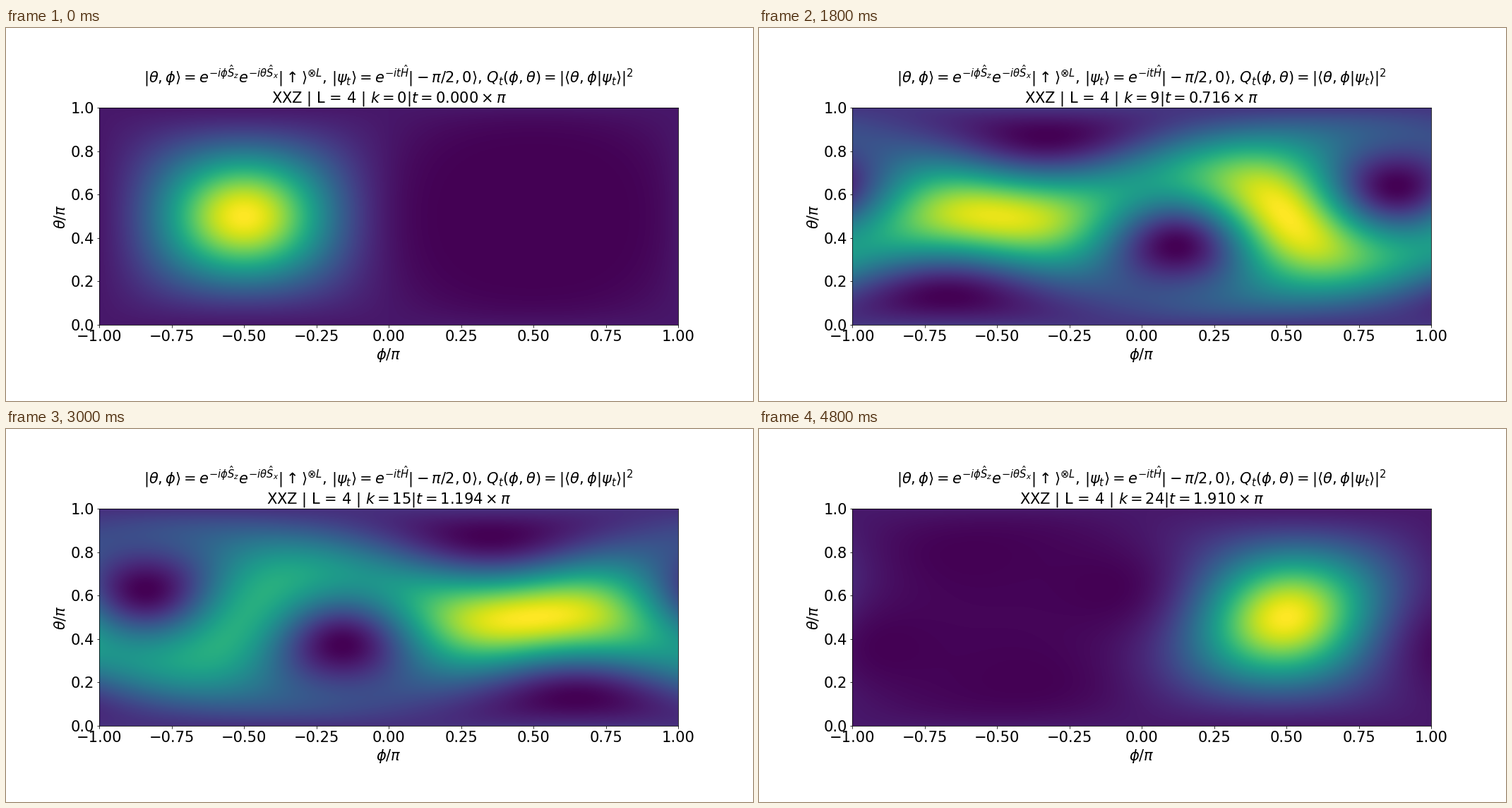
Animation of 1058 by 529 pixels, one loop 5000 ms. Source, as a matplotlib script:

```python
import itertools

import matplotlib.pyplot as plt
import numpy as np
from matplotlib.animation import FuncAnimation

W, H, DPI = 1058, 529, 72
FRAMES, INTERVAL = 25, 200
L = 4           # spins in the open chain
DELTA = 0.5     # z anisotropy
ALPHA = 6       # decay of the coupling with distance
DT = 0.25

plt.rcParams.update({"font.family": "DejaVu Sans", "font.size": 21})


def xxz_hamiltonian():
    """Open XXZ chain in Pauli matrices, basis indexed by bit strings."""
    dim = 2 ** L
    ham = np.zeros((dim, dim))
    for i, j in itertools.combinations(range(L), 2):
        coupling = 1 / (j - i) ** ALPHA
        for s in range(dim):
            if (s >> i & 1) == (s >> j & 1):
                ham[s, s] += coupling * DELTA
            else:
                ham[s, s] -= coupling * DELTA
                ham[s ^ (1 << i) ^ (1 << j), s] += 2 * coupling
    return ham


energy, modes = np.linalg.eigh(xxz_hamiltonian())
start = modes.T @ np.full(2 ** L, 2 ** (-L / 2))
flips = np.array([bin(s).count("1") for s in range(2 ** L)])

# Pixel-centre grid of the angles, in units of pi
NX, NY = 820, 308
phi = (np.arange(NX) + 0.5) / NX * 2 - 1
theta = ((np.arange(NY) + 0.5) / NY)[:, None]
up, down = np.cos(np.pi * theta / 2), np.sin(np.pi * theta / 2)
turn = np.exp(-1j * np.pi * (phi + 0.5))
coherent = [up ** (L - n) * down ** n * turn ** n for n in range(L + 1)]


def husimi(t):
    psi = modes @ (np.exp(-1j * energy * t) * start)
    overlap = sum(psi[flips == n].sum() * coherent[n] for n in range(L + 1))
    return np.abs(overlap) ** 2


FORMULA = (
    r"$|\theta,\phi\rangle=e^{-i\phi\hat{S}_z}e^{-i\theta\hat{S}_x}"
    r"|\uparrow\rangle^{\otimes L}$, "
    r"$|\psi_t\rangle=e^{-it\hat{H}}|-\pi/2,0\rangle$, "
    r"$Q_t(\phi,\theta)=|\langle\theta,\phi|\psi_t\rangle|^2$"
)

fig, ax = plt.subplots(figsize=(W / DPI, H / DPI), dpi=DPI, facecolor="white")
fig.subplots_adjust(left=0.125, right=0.9, bottom=0.11, top=0.88)
image = ax.imshow(husimi(0), origin="lower", extent=(-1, 1, 0, 1),
                  aspect=0.75, cmap="viridis", interpolation="bilinear")
ax.set_xticks(np.linspace(-1, 1, 9))
ax.set_yticks(np.linspace(0, 1, 6))
ax.set_xlabel(r"$\phi/\pi$")
ax.set_ylabel(r"$\theta/\pi$")


def update(k):
    t = k * DT
    q = husimi(t)
    image.set_data(q)
    image.set_clim(q.min(), q.max())
    label = rf"XXZ | L = {L} | $k={k}|t={t / np.pi:.3f}\times\pi$"
    ax.set_title(FORMULA + "\n" + label, fontsize=21)
    return [image]


anim = FuncAnimation(fig, update, frames=FRAMES, interval=INTERVAL,
                     init_func=lambda: update(0), repeat=True,
                     repeat_delay=0, blit=False)
plt.show()
```
